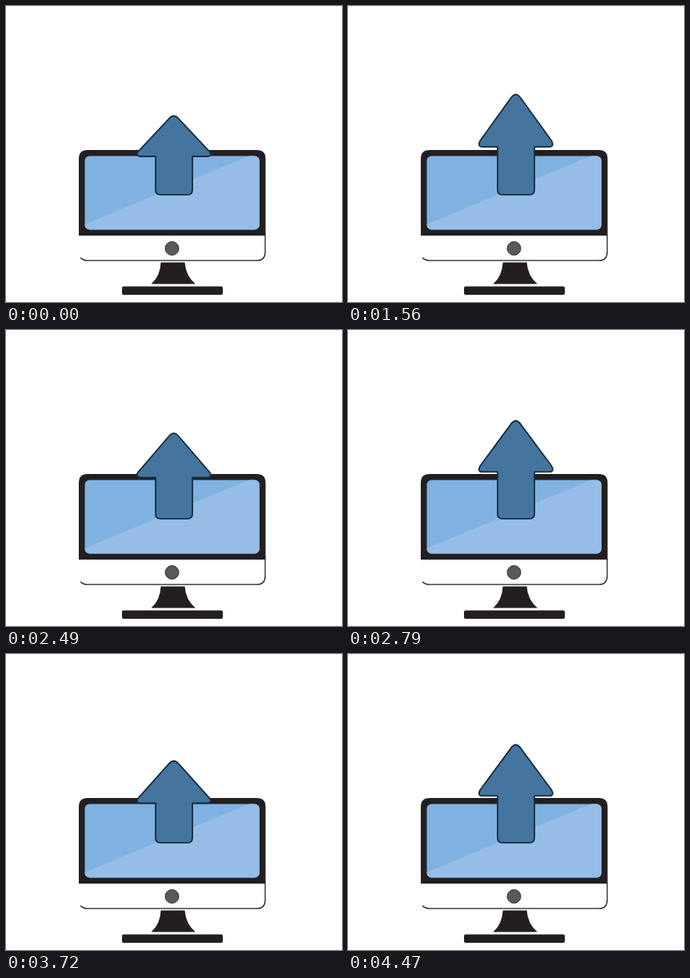
Write an HTML page that moves like this. It is 420 by 370 pixels and loops after 4500 ms.

```html
<!DOCTYPE html>
<html lang="en">
<head>
<meta charset="utf-8">
<title>Upload</title>
<style>
  html, body { margin: 0; width: 100%; height: 100%; overflow: hidden; background: #fff; }
  svg { display: block; width: 420px; height: 370px; }
  .dark { fill: #231f20; }
  .chin { fill: none; stroke: #231f20; stroke-width: 1.3; stroke-linecap: round; }
  #arrow { fill: #44759f; stroke: #162c3e; stroke-width: 1.8; stroke-linejoin: round; }
</style>
</head>
<body>
<svg viewBox="0 0 420 370">
  <defs>
    <clipPath id="screen"><rect x="98.5" y="187.5" width="218.300" height="92" rx="6"/></clipPath>
  </defs>
  <path class="dark" d="M91 287V191Q91 180 102 180H313.500Q324.500 180 324.500 191V287Z"/>
  <g clip-path="url(#screen)">
    <rect x="98" y="187" width="220" height="94" fill="#7fb2e1"/>
    <path d="M98 273L304.500 187H318V281H98Z" fill="#95bde6"/>
  </g>
  <path class="chin" d="M324 287V307.500Q324 318.200 313.500 318.200H102Q96.500 318.200 93.500 315"/>
  <circle cx="207.5" cy="303" r="8.5" fill="#58595b" stroke="#353435"/>
  <path class="dark" d="M193.500 320.500H223.500Q224.500 337 236.800 347.500H181.500Q193 337 193.500 320.500Z"/>
  <rect class="dark" x="145" y="350.500" width="126" height="10.500" rx="2"/>
  <path id="arrow"/>
</svg>
<script>
  const LOOP = 4500, STEP = 30, START = 1370, CYCLE = 1200;
  const REST = 137.5, PEAK = 100, SETTLED = 113.5;
  const RISEN = 120, SETTLED_AT = 220, FALL_AT = 1000;
  const arrow = document.getElementById('arrow');

  function ease(t, t0, t1, from, to) {
    const k = Math.min(1, Math.max(0, (t - t0) / (t1 - t0)));
    return from + (to - from) * k * k * (3 - 2 * k);
  }

  // Shoots past its resting height, settles, holds, then drops back.
  function tipAt(time) {
    if (time < START) return REST;
    const t = (time - START) % CYCLE;
    if (t < RISEN) return ease(t, 0, RISEN, REST, PEAK);
    if (t < FALL_AT) return ease(t, RISEN, SETTLED_AT, PEAK, SETTLED);
    return ease(t, FALL_AT, CYCLE, SETTLED, REST);
  }

  // The foot stays fixed while the head moves and lengthens.
  function arrowPath(tip) {
    const base = 188 - 0.44 * (REST - tip);
    const head = base - tip;
    const side = base - 0.12 * head;
    const cap = 0.08 * head;
    return `M187 ${base}H168.500C162.800 ${base} 162.800 ${base - 3.5} 165.300 ${side}` +
      `L203 ${tip + cap}Q209.700 ${tip - cap} 216.400 ${tip + cap}` +
      `L254.300 ${side}C256.800 ${base - 3.5} 256.800 ${base} 251.100 ${base}H233` +
      'V230Q233 235.900 227 235.900H193Q187 235.900 187 230Z';
  }

  function draw() {
    const time = Math.floor((performance.now() % LOOP) / STEP) * STEP;
    arrow.setAttribute('d', arrowPath(tipAt(time)));
    requestAnimationFrame(draw);
  }
  draw();
</script>
</body>
</html>
```
